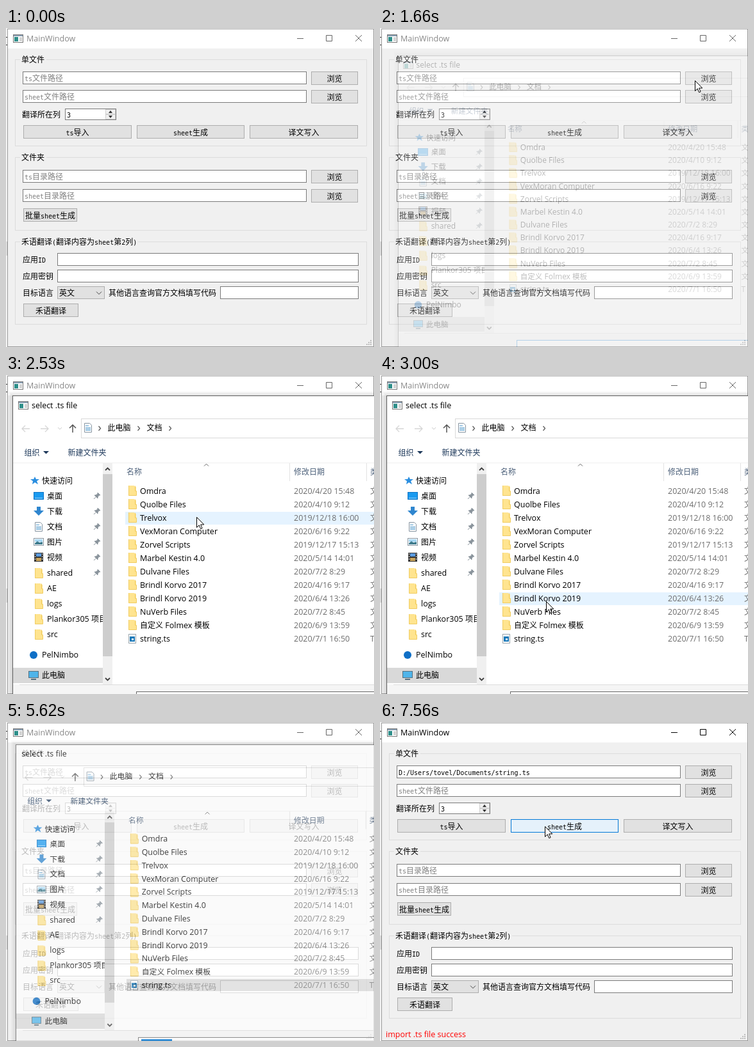
An HTML page for the animation above (8 s loop, 574 by 499 pixels).

```html
<!DOCTYPE html>
<html lang="zh-CN">
<head>
<meta charset="utf-8">
<title>MainWindow</title>
<style>
  html, body { margin: 0; width: 100%; height: 100%; overflow: hidden; background: #f0f0f0; }
  svg { display: block; width: 574px; height: 499px; }
  rect { shape-rendering: crispEdges; }
  text { white-space: pre; font: 12px "Noto Sans CJK SC", "Noto Sans CJK", sans-serif; }
  .form .latin { font: 10px "DejaVu Sans Mono", "Liberation Mono", monospace; }
  .ui .latin { font: 12.5px "Open Sans", "Noto Sans", sans-serif; }
</style>
</head>
<body>
<svg id="stage" viewBox="0 0 574 499" xmlns="http://www.w3.org/2000/svg"></svg>
<script>
const LOOP = 8000;
const INK = '#000', GREY = '#808080', BLUE = '#0078d7';

// Shape helpers
const fill = (x, y, w, h, color, extra = '') =>
  `<rect x="${x}" y="${y}" width="${w}" height="${h}" fill="${color}" ${extra}/>`;
const box = (x, y, w, h, color, line, extra = '') =>
  `<rect x="${x + .5}" y="${y + .5}" width="${w - 1}" height="${h - 1}" fill="${color}" stroke="${line}" ${extra}/>`;
const path = (d, line, width = 1, color = 'none', extra = '') =>
  `<path d="${d}" fill="${color}" stroke="${line}" stroke-width="${width}" ${extra}/>`;
const runs = str => str.replace(/[\x20-\x7e]+/g, s => `<tspan class="latin">${s}</tspan>`);
const text = (x, mid, str, color = INK, extra = '') =>
  `<text x="${x}" y="${mid + 4.5}" fill="${color}" ${extra}>${runs(str)}</text>`;

// Main window
const buttons = [
  [476, 68, 73, '浏览'], [476, 97, 73, '浏览'],
  [27, 152, 169, 'ts导入'], [204, 152, 168, 'sheet生成'], [380, 152, 169, '译文写入'],
  [476, 222, 73, '浏览'], [476, 252, 73, '浏览'], [27, 282, 84, '批量sheet生成'],
  [27, 431, 86, '禾语翻译']
];
const BUTTON_H = 21;
const HINT = 'ts文件路径', CHOSEN = 'D:/Users/tovel/Documents/string.ts';

const button = ([x, y, w, label], i) =>
  box(x, y, w, BUTTON_H, '#e1e1e1', '#adadad', `id="btn${i}"`) +
  text(x + w / 2, y + 11, label, INK, 'text-anchor="middle"');
const field = (x, y, w, hint = '', id = '') =>
  box(x, y, w, 20, '#fff', '#7a7a7a') + text(x + 3, y + 10.5, hint, GREY, id && `id="${id}"`);
const group = (y, h, label, w) =>
  box(14, y, 549, h, 'none', '#dcdcdc') + fill(22, y, w, 2, '#f0f0f0') + text(24, y, label);
const appIcon = (x, y) =>
  box(x, y, 16, 13, '#fff', '#777') + fill(x + 1, y + 1, 14, 2, '#8aa0b4') +
  fill(x + 2, y + 4, 6, 7, '#2f8f8a') + path(`M${x + 10} ${y + 5.5}h4m-4 2h4m-4 2h4`, '#aaa');

function grip() {
  let s = '';
  for (let r = 0; r < 3; r++)
    for (let c = 2 - r; c < 3; c++) s += fill(562 + c * 3, 488 + r * 3, 2, 2, '#bfbfbf');
  return s;
}

function mainWindow() {
  return fill(0, 0, 574, 499, '#f3f3f3') +
    path('M0 14.5h2M0 26.5h2', '#333') + fill(1, 334, 1, 22, '#bbb') +
    box(2, 1, 572, 498, '#f0f0f0', '#9a9a9a') + fill(3, 2, 570, 30, '#fff') + appIcon(11, 10) +
    `<g class="ui">${text(32, 16.5, 'MainWindow', '#888', 'id="title"')}</g>` +
    '<g id="caption" fill="none"><path d="M454 16.5h10M499.5 11.5h9v9h-9zM545 11l10 10m0-10l-10 10"/></g>' +
    '<g class="form">' +
    group(49, 136, '单文件', 41) + group(202, 115, '文件夹', 41) +
    group(334, 130, '禾语翻译(翻译内容为sheet第2列)', 184) +
    field(26, 68, 443, HINT, 'source') + field(26, 97, 443, 'sheet文件路径') +
    text(25, 135, '翻译所在列') + box(92, 126, 80, 18, '#fff', '#7a7a7a') + text(95, 135, '3') +
    box(155, 127, 16, 8, '#f0f0f0', '#d0d0d0') + box(155, 135, 16, 8, '#f0f0f0', '#d0d0d0') +
    path('M160 133l3-4 3 4zM160 137l3 4 3-4z', 'none', 0, '#333') +
    field(26, 222, 443, 'ts目录路径') + field(26, 252, 443, 'sheet目录路径') +
    text(26, 362, '应用ID') + field(80, 352, 470) +
    text(26, 388, '应用密钥') + field(80, 378, 470) +
    text(26, 414, '目标语言') + box(80, 404, 74, 20, '#e1e1e1', '#adadad') + text(83, 414, '英文') +
    path('M141 412.5l4 4 4-4', '#444') +
    text(160, 414, '其他语言查询官方文档填写代码') + field(334, 404, 216) +
    buttons.map(button).join('') + '</g>' + grip() +
    `<g class="ui">${text(9, 488, 'import .ts file success', '#f00', 'id="status"')}</g>`;
}

// File dialog
const files = [
  ['Omdra', '2020/4/20 15:48'], ['Quolbe Files', '2020/4/10 9:12'],
  ['Trelvox', '2019/12/18 16:00'], ['VexMoran Computer', '2020/6/16 9:22'],
  ['Zorvel Scripts', '2019/12/17 15:13'], ['Marbel Kestin 4.0', '2020/5/14 14:01'],
  ['Dulvane Files', '2020/7/2 8:29'], ['Brindl Korvo 2017', '2020/4/16 9:17'],
  ['Brindl Korvo 2019', '2020/6/4 13:26'], ['NuVerb Files', '2020/7/2 8:45'],
  ['自定义 Folmex 模板', '2020/6/9 13:59'], ['string.ts', '2020/7/1 16:50']
];
const places = ['桌面', '下载', '文档', '图片', '视频', 'shared', 'AE', 'logs', 'Plankor305 项目', 'src'];
const LAST = files.length - 1;
const rowTop = i => 171 + 21 * i;

const folder = (x, y) =>
  path(`M${x} ${y}h9l1 2h2v14h-12z`, 'none', 0, '#ffe48f') +
  path(`M${x + .5} ${y}v15.5h12v-7h-2v-8`, '#f0cc62');
const page = (x, y) =>
  path(`M${x + .5} ${y + .5}h8l3 3v11h-11z`, '#8795a1', 1, '#fff') +
  path(`M${x + 2} ${y + 4.5}h5m-5 3h8m-8 2h8m-8 2h8`, '#5aa0d0');
const pin = y =>
  path(`M143 ${y - 5}l4 4-2 0-2 3 0 2-5-5 2 0 3-2zM140 ${y + 2}l-3 3`, '#8a949c', 1, '#8a949c');

const placeIcons = [
  y => box(43, y - 6, 16, 12, '#1b9af0', '#0f74c4') + fill(45, y + 3, 12, 1, '#8fd0fa'),
  y => path(`M48 ${y - 7}h6v6h5l-8 8-8-8h5z`, 'none', 0, '#2f86cf'),
  y => page(45, y - 7),
  y => box(43, y - 6, 16, 12, '#fff', '#8795a1') + fill(45, y - 4, 12, 4, '#a8d8f4') +
       path(`M45 ${y + 4}v-2l4-3 3 2 5-1v4z`, 'none', 0, '#3d7a8c'),
  y => fill(44, y - 7, 14, 14, '#333') + fill(47, y - 6, 8, 5, '#5a9be0') + fill(47, y + 1, 8, 5, '#c7a25a') +
       path(`M45.5 ${y - 6}v12m11-12v12`, '#ddd', 1, 'none', 'stroke-dasharray="2 2"')
];

function sidebar() {
  const rows = places.map((name, i) => {
    const y = 189 + 24 * i;
    return (placeIcons[i] ? placeIcons[i](y) : folder(45, y - 7)) +
      text(64, y, name) + (i < 6 ? pin(y) : '');
  }).join('');
  return path('M45 159l2 4 5 0-4 3 2 5-5-3-4 3 1-5-4-3 5 0z', 'none', 0, '#2b8fe0') +
    text(56, 165.5, '快速访问') + rows +
    '<circle cx="43" cy="438" r="6" fill="#0f6fc6"/>' + text(56, 437.5, 'PelNimbo') +
    fill(11, 458, 140, 24, '#d9d9d9') + box(35, 463, 16, 11, '#4fb4ea', '#56707f') +
    fill(39, 475, 8, 2, '#56707f') + text(56, 469.5, '此电脑') +
    fill(151, 138, 15, 346, '#f0f0f0') + fill(151, 155, 15, 285, '#cdcdcd') +
    path('M155 149l3.5-3.5 3.5 3.5M155 474l3.5 3.5 3.5-3.5', '#404040', 1.8);
}

function fileRow([name, date], i) {
  const y = rowTop(i), mid = y + 10.5, isFile = i === LAST;
  const icon = isFile
    ? box(191, y + 3, 12, 15, '#fff', '#9aa5ad') + fill(193, y + 7, 8, 8, '#1878b8') + fill(196, y + 10, 3, 3, '#fff')
    : folder(191, y + 2);
  return box(185, y, 400, 21, 'none', 'none', `id="row${i}"`) + icon + text(209, mid, name) +
    text(449, mid, date, '#6d6d6d') + text(568, mid, isFile ? 'T' : '文', '#6d6d6d');
}

function dialog() {
  const shadow = [3, 7, 11, 15].map(w =>
    `<rect x="11" y="33" width="700" height="600" fill="none" stroke="#000" stroke-width="${w}" opacity=".035"/>`).join('');
  const chevrons = [146, 207, 256].map(x => path(`M${x - 1.5} 80l3 3.5-3 3.5`, '#555', 1.2)).join('');
  return shadow + box(10, 32, 700, 600, '#fff', '#5c5c5c') +
    `<g id="dialogIcon">${appIcon(19, 41)}</g>` + text(40, 47, 'select .ts file', INK, 'id="dialogTitle"') +
    path('M37 84h-12m5-5l-5 5 5 5M54 84h12m-5-5l5 5-5 5', '#d6d6d6', 1.3) +
    path('M81 82l3 3 3-3', '#ccc') + path('M104 90v-12m-5 5l5-5 5 5', '#555', 1.5) +
    box(117, 68, 500, 31, '#fff', '#d9d9d9') + page(122, 75) + chevrons +
    text(158.5, 82.5, '此电脑') + text(219.5, 82.5, '文档') +
    text(28.5, 121.5, '组织', '#1e395b') + path('M58 119h9l-4.5 4.5z', 'none', 0, '#1e395b') +
    text(96.5, 121.5, '新建文件夹', '#1e395b') +
    fill(11, 137, 563, 1, '#f0f0f0') + sidebar() +
    path('M309 142.5l3.5-3.5 3.5 3.5', '#666') +
    path('M442.5 138v28M562.5 138v28', '#e2e2e2') +
    text(188, 151.5, '名称', '#4c607a') + text(449, 151.5, '修改日期', '#4c607a') + text(568, 151.5, '类', '#4c607a') +
    files.map(fileRow).join('') +
    fill(11, 484, 563, 30, '#f5f5f5') + fill(21, 484, 553, 1, '#dcdcdc') +
    box(203, 495, 500, 24, '#fff', '#666', 'id="nameBox"') + fill(208, 498, 49, 16, BLUE, 'id="nameMark"');
}

const stage = document.getElementById('stage');
stage.innerHTML = mainWindow() + `<g id="dialog" class="ui">${dialog()}</g>` +
  '<path id="cursor" d="M.5.5v16l3.7-3.6 2.5 5.8 2.4-1-2.5-5.7h5.2z" fill="#fff" stroke="#000"/>';

const el = {};
stage.querySelectorAll('[id]').forEach(node => el[node.id] = node);
const set = (id, attrs) => { for (const k in attrs) el[id].setAttribute(k, attrs[k]); };
const show = (id, on) => set(id, { display: on ? 'inline' : 'none' });
const within = (t, a, b) => t >= a && t < b;

// Pointer moves: start, end, steps, from, to
const moves = [
  [200, 890, 10, [500, 376], [491, 82]],
  [1890, 2450, 8, [487, 86], [330, 182]],
  [2530, 3160, 9, [297, 222], [242, 415]],
  [4160, 4300, 3, [270, 440], [340, 510]],
  [6090, 6570, 7, [514, 371], [265, 163]],
  [6780, 7030, 4, [240, 163], [165, 163]],
  [7320, 7560, 4, [180, 163], [257, 163]]
];

function pointer(t) {
  const move = moves.filter(m => t >= m[0]).pop();
  if (!move) return null;
  const [a, b, n, from, to] = move;
  const p = Math.min(1, Math.floor((t - a) / (b - a) * (n - 1) + 1e-6) / (n - 1));
  const e = p * p * (3 - 2 * p);
  return from.map((v, i) => Math.round(v + (to[i] - v) * e));
}

// Dialog states: time, opacity, scale
const fades = [
  [0, 0, 1], [1660, .25, .96], [1740, .7, .987], [1830, .985, .998], [1890, 1, 1],
  [5620, .73, .989], [5710, .25, .965], [5790, 0, 1]
];

function draw(t) {
  const at = pointer(t);
  const [, alpha, scale] = fades.filter(f => t >= f[0]).pop();
  const open = alpha > 0, closing = t >= 5620, loaded = t >= 5790;

  show('cursor', at);
  if (at) set('cursor', { transform: `translate(${at})` });
  show('dialog', open);
  set('dialog', { opacity: alpha, transform: `translate(455 315) scale(${scale}) translate(-455 -315)` });
  show('dialogIcon', !closing);
  set('dialogTitle', { x: closing ? 19.5 : 40 });

  const active = within(t, 1290, 1430) || t >= 5710;
  set('title', { fill: active ? INK : '#888' });
  set('caption', { stroke: active ? INK : '#666' });
  set('source', { fill: loaded ? INK : GREY });
  el.source.innerHTML = runs(loaded ? CHOSEN : HINT);
  show('status', loaded);

  buttons.forEach(([x, y, w], i) => {
    const hot = at && !open && within(at[0], x, x + w) && within(at[1], y, y + BUTTON_H);
    const down = hot && within(t, 1290, 1360);
    set('btn' + i, {
      fill: down ? '#cce4f7' : hot ? '#e5f1fb' : '#e1e1e1',
      stroke: down ? '#005499' : hot ? BLUE : '#adadad'
    });
  });

  files.forEach((_, i) => {
    const hot = at && within(t, 1890, 5620) && at[0] >= 185 && within(at[1], rowTop(i), rowTop(i + 1));
    const picked = i === LAST && t >= 3390;
    const blurred = picked && t >= 4930;
    set('row' + i, {
      fill: blurred ? '#d9d9d9' : picked ? '#cce8ff' : hot ? '#e5f3ff' : 'none',
      stroke: picked && !blurred ? '#99d1ff' : 'none'
    });
  });

  set('nameBox', { stroke: t < 2450 || within(t, 4300, 4630) ? BLUE : '#666' });
  show('nameMark', open && t >= 4930);
}

const start = performance.now();
function tick() {
  draw((performance.now() - start) % LOOP);
  requestAnimationFrame(tick);
}
tick();
</script>
</body>
</html>
```
